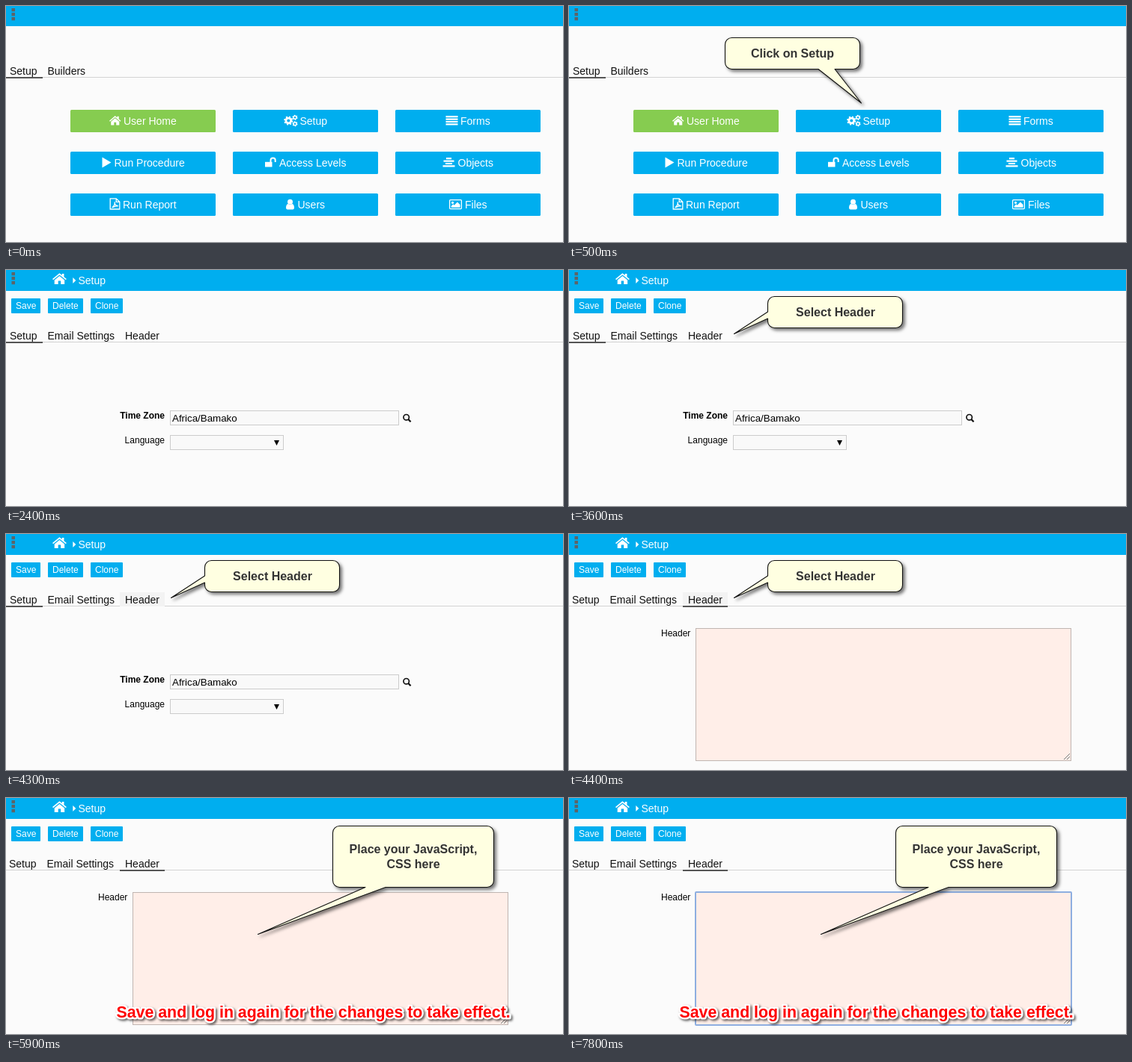
Write an HTML page that moves like this. It is 744 px wide and 316 px high and loops after 8.4 s.

```html
<!DOCTYPE html>
<html lang="en">
<head>
<meta charset="utf-8">
<title>Setup header walkthrough</title>
<style>
html, body { margin: 0; width: 100%; height: 100%; overflow: hidden; background: #fbfbfb; }
svg { display: block; width: 744px; height: 316px; font-family: "Liberation Sans", Arial, sans-serif; }
text { white-space: pre; }
.bar, .btn { fill: #00aeef; }
.green { fill: #86cc50; }
.tab { font-size: 14px; fill: #111; }
.white { font-size: 14px; fill: #fff; }
.small { font-size: 12px; }
.bold { font-weight: bold; }
.rule { fill: #d3d3d3; }
.active { fill: #555; }
.icon { fill: #fff; }
.line { fill: none; stroke: #fff; }
.field { fill: #f9f9f9; stroke: #ccc; }
.callout { filter: drop-shadow(3px 3px 2px #0008); }
.callout path { fill: #ffffe1; stroke: #111; stroke-width: 1.1; stroke-linejoin: round; }
.callout text { font: bold 16px "Liberation Sans", Arial, sans-serif; fill: #333; text-anchor: middle; }
.notice { font-size: 21.33px; font-weight: bold; fill: #f00; stroke: #fff; stroke-width: 5px;
  stroke-linejoin: round; paint-order: stroke; filter: drop-shadow(2px 2px 1.5px #0009); }

/* Hard cuts on one shared 8.4 s timeline */
.cue { opacity: 0; animation: 8400ms step-end infinite; }
.home { animation-name: home; }
.click { animation-name: click; }
.press { animation-name: press; }
.form { animation-name: form; }
.setup { animation-name: setup; }
.hover { animation-name: hover; }
.select { animation-name: select; }
.header { animation-name: header; }
.place { animation-name: place; }
.save { animation-name: save; }
.focus { animation-name: focus; }
.caret { animation-name: caret; }
@keyframes home { 0% { opacity: 1 } 28.57% { opacity: 0 } }
@keyframes click { 5.95% { opacity: 1 } 28.57% { opacity: 0 } }
@keyframes press { 25% { opacity: 1 } 28.57% { opacity: 0 } }
@keyframes form { 28.57%, to { opacity: 1 } }
@keyframes setup { 28.57% { opacity: 1 } 52.38% { opacity: 0 } }
@keyframes hover { 50% { opacity: 1 } 54.76% { opacity: 0 } }
@keyframes select { 38.09% { opacity: 1 } 60.71% { opacity: 0 } }
@keyframes header { 52.38%, to { opacity: 1 } }
@keyframes place { 65.47%, to { opacity: 1 } }
@keyframes save { 70.23%, to { opacity: 1 } }
@keyframes focus { 75%, to { opacity: 1 } }
@keyframes caret { 75%, 86.9% { opacity: 1 } 80.95%, 92.85% { opacity: 0 } }
</style>
</head>
<body>
<svg viewBox="0 0 744 316">
  <defs>
    <path id="house" d="M0 7.4 8 .6l2.8 2.4V1.2h2.3v3.7L16 7.4l-.9 1.1L8 2.6.9 8.500zM2.300 8.600 8 3.900l5.700 4.700V13.500H9.500V9.500h-3v4H2.300z"/>
    <g id="blank"><rect width="194" height="30" rx="1.500"/></g>
  </defs>

  <rect width="744" height="316" fill="#fbfbfb"/>
  <rect class="bar" width="744" height="27"/>

  <g class="cue home">
    <rect class="rule" y="95" width="744" height="1"/>
    <rect class="active" y="95" width="49" height="2"/>
    <text class="tab" x="5" y="92">Setup</text>
    <text class="tab" x="55.500" y="92">Builders</text>

    <g class="btn">
      <use href="#blank" class="green" x="86" y="139"/>
      <use href="#blank" x="303" y="139"/>
      <use href="#blank" x="520" y="139"/>
      <use href="#blank" x="86" y="195"/>
      <use href="#blank" x="303" y="195"/>
      <use href="#blank" x="520" y="195"/>
      <use href="#blank" x="86" y="251"/>
      <use href="#blank" x="303" y="251"/>
      <use href="#blank" x="520" y="251"/>
    </g>
    <g class="white">
      <text x="157" y="159">User Home</text>
      <text x="392.500" y="159">Setup</text>
      <text x="607" y="159">Forms</text>
      <text x="144.500" y="215">Run Procedure</text>
      <text x="365" y="215">Access Levels</text>
      <text x="603.500" y="215">Objects</text>
      <text x="156" y="271">Run Report</text>
      <text x="389.500" y="271">Users</text>
      <text x="613" y="271">Files</text>
    </g>

    <use href="#house" class="icon" transform="translate(138 146.500) scale(.97)"/>
    <g class="line">
      <circle cx="377.300" cy="153.500" r="3.400" stroke-width="2.800"/>
      <circle cx="377.300" cy="153.500" r="5.200" stroke-width="1.800" stroke-dasharray="2.040"/>
      <circle cx="386" cy="149.300" r="2" stroke-width="1.500"/>
      <circle cx="386" cy="149.300" r="3" stroke-width="1.200" stroke-dasharray="1.570"/>
      <circle cx="386" cy="157.800" r="2" stroke-width="1.500"/>
      <circle cx="386" cy="157.800" r="3" stroke-width="1.200" stroke-dasharray="1.570"/>
    </g>
    <path class="line" stroke-width="2.200" d="M587.500 148.200h16m-16 3.400h16m-16 3.400h16m-16 3.400h16"/>
    <path class="icon" d="M128.500 202.600 140.500 209.500 128.500 216.400z"/>
    <path class="icon" d="M346 208.800h9.500v6.700H346z"/>
    <path class="line" stroke-width="2" d="M353.500 209v-2.500a3.100 3.100 0 0 1 6.200 0v2.500"/>
    <path class="line" stroke-width="2.200" d="M588 204.200h7m-10.500 3.400h14m-11.500 3.400h9m-12.500 3.400h16"/>
    <path class="line" stroke-width="1.300" d="M139.200 257.800h8l4.600 4.500v9.700h-12.600zM147.200 257.800v4.500h4.600M141.500 270c3-1.500 4.200-5 3.600-7.500 0 3.500 2 5.300 4.800 5.200-3 0-5 .6-7 1.800"/>
    <g class="icon">
      <circle cx="379.500" cy="262.200" r="3.500"/>
      <path d="M374 270c0-3 1.200-5 3-5q2.500 1.800 5 0c1.800 0 3 2 3 5 0 1.500-.8 2.400-2 2.400h-7c-1.200 0-2-.9-2-2.400z"/>
    </g>
    <rect class="line" stroke-width="1.300" x="592.600" y="259.600" width="15.800" height="12" rx="1"/>
    <g class="icon">
      <circle cx="596.500" cy="263.300" r="1.600"/>
      <path d="M594.700 269.700v-1.800l2.600-2.600 1.400 1.400 4.200-4.200 3.600 3.600v3.600z"/>
    </g>
    <rect class="cue press" x="302.500" y="138.500" width="195" height="31" rx="1.500" fill="none" stroke="#9db4ea"/>
  </g>

  <g class="cue form">
    <rect class="bar" width="744" height="28"/>
    <use href="#house" class="icon" transform="translate(62 3.500) scale(1.180 1.150)"/>
    <path class="icon" d="M89.300 10 93.300 14 89.300 18z"/>
    <text class="white" x="96.500" y="19">Setup</text>
    <g class="btn">
      <rect x="7" y="38" width="39" height="20" rx="1"/>
      <rect x="56" y="38" width="47" height="20" rx="1"/>
      <rect x="113" y="38" width="43" height="20" rx="1"/>
    </g>
    <g class="small" fill="#fff">
      <text x="13" y="52">Save</text>
      <text x="62" y="52">Delete</text>
      <text x="119" y="52">Clone</text>
    </g>
    <rect class="rule" y="96" width="744" height="1"/>
    <rect class="cue hover" x="152" y="78" width="60" height="19" fill="#f3f3f3"/>
    <text class="tab" x="159" y="93">Header</text>
  </g>

  <g class="cue setup">
    <rect class="active" y="96" width="49" height="2"/>
    <text class="tab" x="5" y="93">Setup</text>
    <text class="tab" x="55.500" y="93">Email Settings</text>
    <g class="small" text-anchor="end">
      <text class="bold" x="212" y="199">Time Zone</text>
      <text x="212" y="232">Language</text>
    </g>
    <rect class="field" x="219.500" y="188.500" width="305" height="19"/>
    <text x="222" y="203" font-size="13.330">Africa/Bamako</text>
    <g fill="none" stroke="#111">
      <circle cx="534.700" cy="197.200" r="3.700" stroke-width="1.700"/>
      <path stroke-width="2.200" d="m537.400 200 3.200 3.300"/>
    </g>
    <rect class="field" x="219.500" y="221.500" width="151" height="19"/>
    <path d="M358 228h7l-3.500 7z"/>
  </g>

  <g class="cue header">
    <rect class="active" x="152" y="96" width="60" height="2"/>
    <text class="tab" x="4" y="93">Setup</text>
    <text class="tab" x="54.500" y="93">Email Settings</text>
    <text class="small" x="123" y="137">Header</text>
    <rect x="169.500" y="126.500" width="501" height="177" fill="#ffeee8" stroke="#c0b5b1"/>
    <path d="m661 302 8-8m-4 8 4-4" fill="none" stroke="#777"/>
    <rect class="cue focus" x="169" y="126" width="502" height="178" rx="1" fill="none" stroke="#8eaee0" stroke-width="2"/>
    <rect class="cue caret" x="172" y="129" width="1" height="13"/>
  </g>

  <path fill="#5d6468" d="M7.500 3h4.500v4.200H7.500zM7.500 9h4.500v4.200H7.500zM7.500 15h4.500v4.200H7.500z"/>

  <g class="cue click">
    <g class="callout">
      <path d="M217.500 42.500h162a9 9 0 0 1 9 9v24a9 9 0 0 1-9 9H355L390.500 130 333 84.500H217.500a9 9 0 0 1-9-9v-24a9 9 0 0 1 9-9z"/>
      <text x="298.500" y="69">Click on Setup</text>
    </g>
  </g>
  <g class="cue select">
    <g class="callout">
      <path d="M274.500 35.500h162a9 9 0 0 1 9 9v24a9 9 0 0 1-9 9h-162a9 9 0 0 1-9-9V65L220.500 85.500 265.500 56V44.500a9 9 0 0 1 9-9z"/>
      <text x="356" y="62">Select Header</text>
    </g>
  </g>
  <g class="cue place">
    <g class="callout">
      <path d="M445.500 37.500h197a9 9 0 0 1 9 9v64a9 9 0 0 1-9 9H507L336.500 182.500 480 119.500H445.500a9 9 0 0 1-9-9v-64a9 9 0 0 1 9-9z"/>
      <text x="544" y="74">Place your JavaScript,</text>
      <text x="544" y="94">CSS here</text>
    </g>
  </g>
  <g class="cue save">
    <text class="notice" x="147.500" y="294">Save and log in again for the changes to take effect.</text>
  </g>
</svg>
</body>
</html>
```
